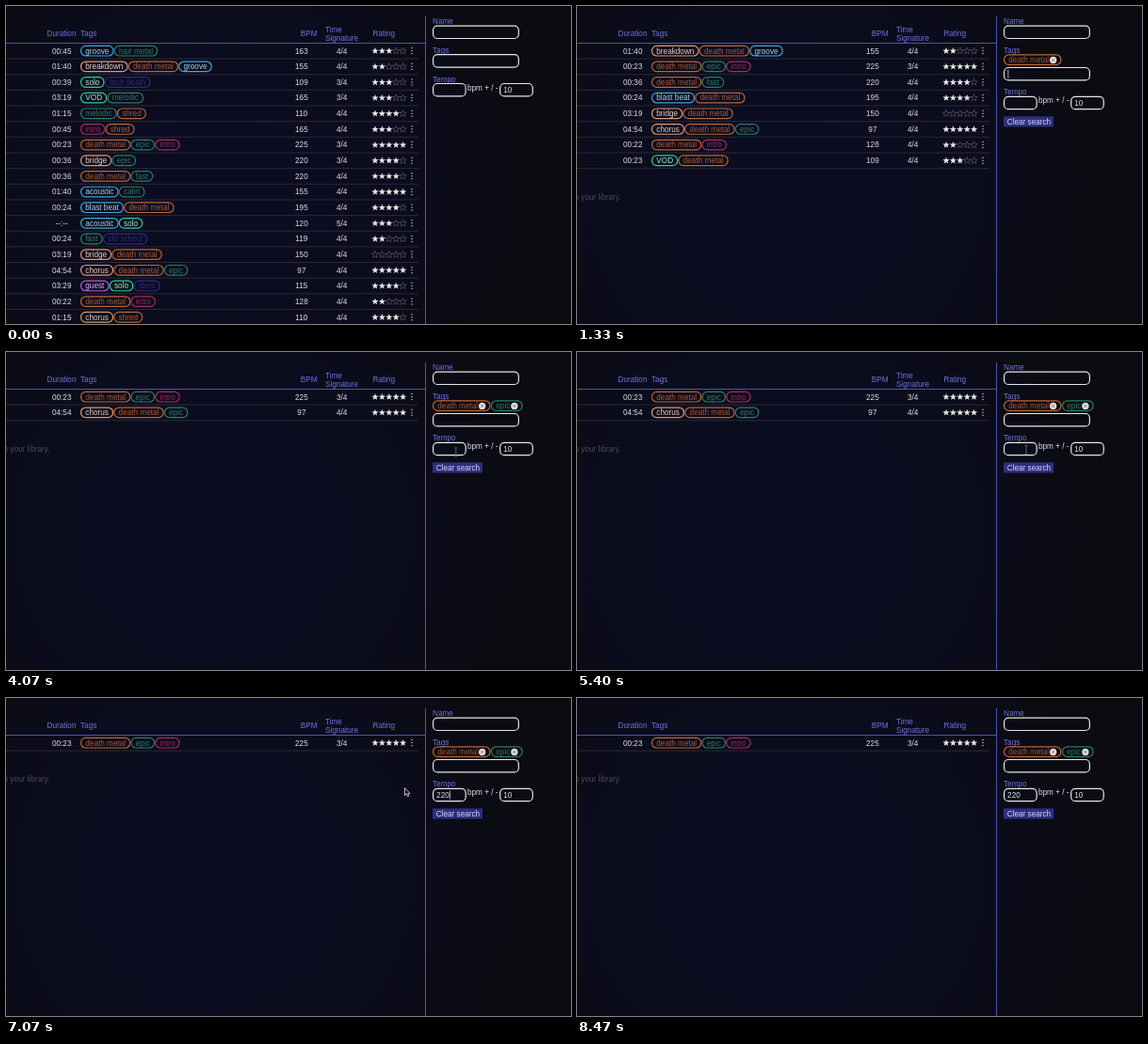
An HTML page with a canvas for the animation above (8.54 s loop, 600x338 px).

```html
<!DOCTYPE html>
<html lang="en">
<head>
<meta charset="utf-8">
<title>Library search</title>
<style>
html, body { margin: 0; overflow: hidden; background: #0b0b12; }
canvas { display: block; }
</style>
</head>
<body>
<canvas id="stage" width="600" height="338"></canvas>
<script>
const ctx = document.getElementById('stage').getContext('2d');
const LOOP = 8540, ROW = 16.65;
const VIOLET = '#7070de', LIGHT = '#dedee2', WHITE = '#e6e6e6';

// Border and text colours shared by groups of tags
const palette = {
  cyan: ['#38a8dc', '#a4d6ee'], peach: ['#e09a70', '#eed0bc'],
  mint: ['#20d692', '#a8eed2'], purple: ['#b85ce0', '#deb4f0'],
  green: ['#2b7e63', '#2b7b62'], orange: ['#bd6433', '#a85b32'],
  pink: ['#b0285f', '#9c2857'], indigo: ['#2b2b80', '#2b2b7c']
};
const groups = {
  cyan: 'groove,acoustic,blast beat', peach: 'breakdown,bridge,chorus',
  mint: 'solo,VOD', purple: 'guest', pink: 'intro',
  green: 'hair metal,melodic,epic,fast,calm', orange: 'death metal,shred',
  indigo: 'tech death,old school,stem'
};
const tagColor = {};
for (const g in groups) for (const tag of groups[g].split(',')) tagColor[tag] = palette[g];

// duration | tags | bpm | time signature | rating
const songs = `00:45|groove,hair metal|163|4/4|3
01:40|breakdown,death metal,groove|155|4/4|2
00:39|solo,tech death|109|3/4|3
03:19|VOD,melodic|165|3/4|3
01:15|melodic,shred|110|4/4|4
00:45|intro,shred|165|4/4|3
00:23|death metal,epic,intro|225|3/4|5
00:36|bridge,epic|220|3/4|4
00:36|death metal,fast|220|4/4|4
01:40|acoustic,calm|155|4/4|5
00:24|blast beat,death metal|195|4/4|4
--:--|acoustic,solo|120|5/4|3
00:24|fast,old school|119|4/4|2
03:19|bridge,death metal|150|4/4|0
04:54|chorus,death metal,epic|97|4/4|5
03:29|guest,solo,stem|115|4/4|4
00:22|death metal,intro|128|4/4|2
01:15|chorus,shred|110|4/4|4
00:23|VOD,death metal|109|4/4|3`.split('\n').map(line => {
  const [time, tags, bpm, sig, stars] = line.split('|');
  return { time, tags: tags.split(','), bpm: +bpm, sig, stars: +stars };
});

function text(s, x, y, color = LIGHT, align = 'left') {
  ctx.fillStyle = color;
  ctx.textAlign = align;
  ctx.fillText(s, x, y + 2.9);
}

function line(x1, y1, x2, y2, color, width = 1) {
  ctx.strokeStyle = color;
  ctx.lineWidth = width;
  ctx.beginPath();
  ctx.moveTo(x1, y1);
  ctx.lineTo(x2, y2);
  ctx.stroke();
}

function box(x, y, w, h, r, color, width) {
  ctx.strokeStyle = color;
  ctx.lineWidth = width;
  ctx.beginPath();
  ctx.roundRect(x, y, w, h, r);
  ctx.stroke();
}

function dot(x, y, r, color) {
  ctx.fillStyle = color;
  ctx.beginPath();
  ctx.arc(x, y, r, 0, 7);
  ctx.fill();
}

// Draws a tag pill and returns where the next one starts
function chip(tag, x, y, removable) {
  const [border, ink] = tagColor[tag];
  const w = ctx.measureText(tag).width + (removable ? 17.5 : 9.3);
  box(x, y - 5.2, w, 10.6, 5, border, 1.2);
  text(tag, x + 4.7, y, ink);
  if (removable) {
    const cx = x + w - 8.2;
    dot(cx, y + .4, 3.7, '#dcdcdc');
    line(cx - 1.1, y - .7, cx + 1.1, y + 1.5, '#555', .8);
    line(cx - 1.1, y + 1.5, cx + 1.1, y - .7, '#555', .8);
  }
  return x + w + 1.7;
}

function star(x, y, filled) {
  ctx.beginPath();
  for (let i = 0; i < 10; i++) {
    const r = i % 2 ? 1.6 : 3.8, a = i * Math.PI / 5 - Math.PI / 2;
    ctx.lineTo(x + r * Math.cos(a), y + r * Math.sin(a));
  }
  ctx.closePath();
  if (filled) {
    ctx.fillStyle = WHITE;
    ctx.fill();
  } else {
    ctx.strokeStyle = '#66666e';
    ctx.lineWidth = .6;
    ctx.stroke();
  }
}

function field(x, y, w, value = '', caret = false) {
  box(x, y - 6.7, w, 13.4, 4.5, WHITE, 1.2);
  text(value, x + 3.5, y + .3);
  if (caret) {
    const cx = x + 4.3 + ctx.measureText(value).width;
    line(cx, y - 4.5, cx, y + 4.7, '#ccc', .8);
  }
}

function background() {
  ctx.fillStyle = '#0b0b11';
  ctx.fillRect(0, 0, 600, 338);
  const glow = ctx.createRadialGradient(220, 190, 30, 220, 190, 330);
  glow.addColorStop(0, '#0b0c22');
  glow.addColorStop(.6, '#0b0c1c');
  glow.addColorStop(1, '#0b0b11');
  ctx.fillStyle = glow;
  ctx.fillRect(0, 0, 600, 338);
}

function table(rows) {
  text('Duration', 43.5, 29.5, VIOLET);
  text('Tags', 79, 29.5, VIOLET);
  text('BPM', 312.8, 29.5, VIOLET);
  text('Time', 339, 25, VIOLET);
  text('Signature', 339, 34, VIOLET);
  text('Rating', 389.5, 29.5, VIOLET);
  line(0, 39.5, 445, 39.5, '#50549c');

  rows.forEach((song, i) => {
    const y = 47.6 + i * ROW;
    text(song.time, 59.2, y, LIGHT, 'center');
    let x = 79.6;
    for (const tag of song.tags) x = chip(tag, x, y) - .3;
    text(song.bpm, 313.9, y, LIGHT, 'center');
    text(song.sig, 356.7, y, LIGHT, 'center');
    for (let s = 0; s < 5; s++) star(392 + s * 7.4, y + .2, s < song.stars);
    for (const d of [-3, 0, 3]) dot(431, y + d, .75, '#c8c8c8');
    line(0, y + 8.5, 438, y + 8.5, '#292a34');
  });
  text('Add more songs to your library.', 46.5, 69.7 + rows.length * ROW, '#4b4b55', 'right');
}

const blink = age => age >= 0 && age % 1000 < 500;
const typed = (word, t, start, step) =>
  word.slice(0, Math.max(0, Math.floor((t - start) / step) + 1));

function panel(s) {
  line(445.5, 11, 445.5, 338, '#5058ae');
  text('Name', 453, 16, VIOLET);
  field(453.6, 27.8, 90.8);
  text('Tags', 453, 47, VIOLET);
  let x = 453.6;
  for (const tag of s.filter) x = chip(tag, x, 57, true);
  const dy = s.filter.length ? 13.8 : 0;
  field(453.6, 58.4 + dy, 90.8, s.query, s.tagCaret);
  text('Tempo', 453, 77.6 + dy, VIOLET);
  field(453.6, 89.2 + dy, 34.6, s.tempo, s.tempoCaret);
  text('bpm + / -', 490, 86.6 + dy);
  field(524.7, 89.2 + dy, 34.6, '10');
  if (dy) {
    ctx.fillStyle = '#2e2f80';
    ctx.fillRect(453, 117.4, 53, 11);
    text('Clear search', 456.7, 122.6, '#d4d4ee');
  }
}

// Pointer stops: time, x, y
const paths = [
  { shape: beam, stops: [[0, 488, 88], [230, 470, 58], [300, 470, 58]] },
  { shape: beam, stops: [[3530, 500, 76], [3950, 478, 107], [4400, 477, 104], [5700, 477, 104]] },
  { shape: arrow, stops: [[6750, 455, 102], [7000, 423.5, 95.5], [7730, 423.5, 95.5], [8100, 415, -14]] }
];

function beam(x, y) {
  line(x, y - 4, x, y + 4, '#777', .8);
  line(x - 1.5, y - 4.5, x + 1.5, y - 4.5, '#777', .7);
  line(x - 1.5, y + 4.5, x + 1.5, y + 4.5, '#777', .7);
}

function arrow(x, y) {
  ctx.beginPath();
  for (const [dx, dy] of [[0, 0], [0, 8], [1.8, 6.4], [3, 9.2], [4.4, 8.6], [3.2, 5.9], [5.6, 5.9]])
    ctx.lineTo(x + dx, y + dy);
  ctx.closePath();
  ctx.fillStyle = '#111';
  ctx.fill();
  ctx.strokeStyle = '#ddd';
  ctx.lineWidth = .8;
  ctx.stroke();
}

function pointer(t) {
  for (const { shape, stops } of paths) {
    const i = stops.findIndex(stop => stop[0] > t);
    if (i < 1) continue;
    const [t0, x0, y0] = stops[i - 1], [t1, x1, y1] = stops[i];
    const p = (t - t0) / (t1 - t0), e = p * p * (3 - 2 * p);
    shape(x0 + (x1 - x0) * e, y0 + (y1 - y0) * e);
  }
}

function state(t) {
  const filter = [];
  if (t >= 1050) filter.push('death metal');
  if (t >= 3000) filter.push('epic');
  const typing = t < 1050 ? typed('death metal', t, 340, 55)
    : t < 3000 ? typed('epic', t, 2200, 130) : '';
  const lastKey = t < 1050 ? 300 : t < 2200 ? 1050 : t < 3000 ? 2590 : 3000;
  return {
    filter, query: typing,
    tagCaret: t < 3500 && (typing && t < 2600 ? true : blink(t - lastKey)),
    tempo: typed('220', t, 5700, 130),
    tempoCaret: t >= 5500 && (t < 5960 || blink(t - 5960)),
    rows: songs.filter(song => filter.every(tag => song.tags.includes(tag))
      && (t < 6270 || Math.abs(song.bpm - 220) <= 10))
  };
}

function draw(now) {
  const t = now % LOOP, s = state(t);
  ctx.font = '8.2px "Liberation Sans", Arial, sans-serif';
  background();
  table(s.rows);
  panel(s);
  pointer(t);
  requestAnimationFrame(draw);
}
requestAnimationFrame(draw);
</script>
</body>
</html>
```
